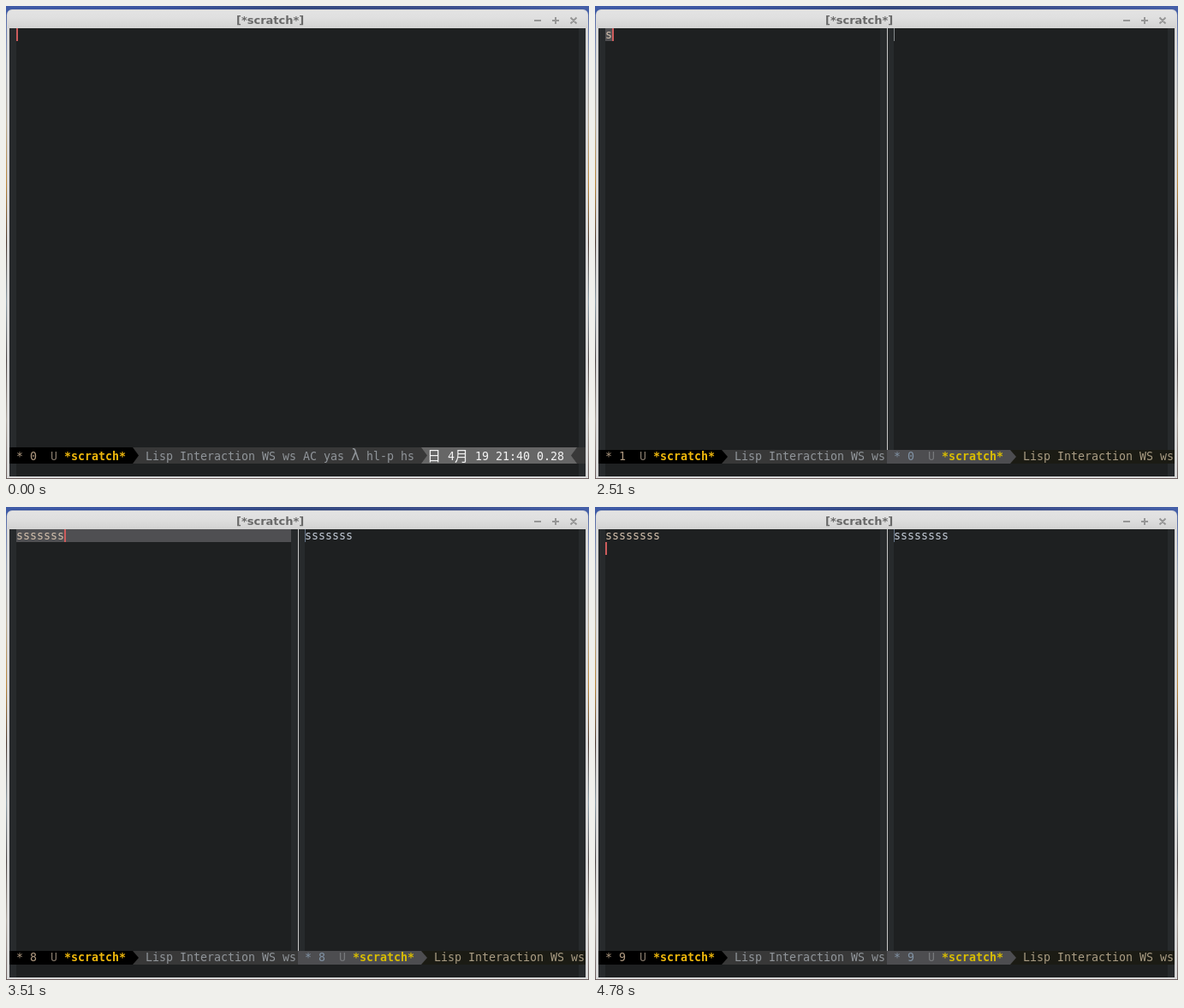
An HTML page with a canvas for the animation above (4850 ms loop, 681 by 553 pixels).

```html
<!DOCTYPE html>
<html lang="en">
<head>
<meta charset="utf-8">
<title>[*scratch*]</title>
<style>
html, body { margin: 0; width: 100%; height: 100%; overflow: hidden; background: #3c4c80; }
canvas { display: block; }
</style>
</head>
<body>
<canvas id="stage" width="681" height="553"></canvas>
<script>
const ctx = document.getElementById('stage').getContext('2d');
const LOOP = 4850, CELL = 8;
const MONO = '13.29px "DejaVu Sans Mono", monospace';
const BG = '#1e2021', FRINGE = '#272a2c', BAR = '#383838';

const timerError = name => `Error running timer \`${name}': (error "Not connected.")`;
const GREEDY = timerError('ac-update-greedy');
const MENU = timerError('ac-show-menu');

// Typing steps: time, letters on the left, letters on the right, echo message
const STEPS = [
  [0, 0, 0, ''],
  [2510, 1, 0, ''], [2570, 1, 1, ''], [2630, 1, 1, GREEDY],
  [2690, 2, 2, ''], [2750, 2, 2, GREEDY],
  [2820, 3, 3, ''], [2920, 3, 3, GREEDY],
  [2960, 4, 3, ''], [3020, 4, 4, ''], [3080, 4, 4, GREEDY],
  [3130, 5, 4, ''], [3170, 5, 5, ''], [3230, 5, 5, GREEDY],
  [3300, 6, 6, ''], [3400, 6, 6, GREEDY],
  [3460, 7, 7, ''], [3570, 7, 7, GREEDY],
  [3630, 8, 7, ''], [3680, 8, 8, ''], [3780, 8, 8, GREEDY],
  [4450, 8, 8, MENU], [4720, 8, 8, '']
];

function rect(x, y, w, h, color) {
  ctx.fillStyle = color;
  ctx.fillRect(x, y, w, h);
}

function text(str, x, y, color, font = MONO) {
  ctx.font = font;
  ctx.fillStyle = color;
  ctx.fillText(str, x, y);
}

function poly(color, ...pts) {
  ctx.fillStyle = color;
  ctx.beginPath();
  for (let i = 0; i < pts.length; i += 2) ctx.lineTo(pts[i], pts[i + 1]);
  ctx.fill();
}

function gradient(x, y, colors) {
  const g = ctx.createLinearGradient(0, 0, x, y);
  colors.forEach((c, i) => g.addColorStop(i / (colors.length - 1), c));
  return g;
}

function drawWindow() {
  rect(0, 0, 681, 553, gradient(0, 553,
    ['#4a62a8', '#8f9ab0', '#b5a58c', '#b98438', '#4a3830', '#8a9aa4', '#4c4444', '#a8a098', '#6a5c5c']));
  rect(0, 0, 681, 10, gradient(681, 0, ['#3f5ba6', '#3c55a0', '#35497f', '#3d4f8c', '#4560a8']));
  ctx.beginPath();
  ctx.roundRect(1, 4, 679, 548, [6, 6, 0, 0]);
  ctx.fillStyle = '#d8d8d8';
  ctx.fill();
  ctx.beginPath();
  ctx.roundRect(2, 5, 677, 21, [5, 5, 0, 0]);
  ctx.fillStyle = gradient(0, 26, ['#e4e4e4', '#e0e0e0', '#d2d2d2']);
  ctx.fill();
  text('[*scratch*]', 269, 21, '#696969', 'bold 13px "DejaVu Sans", sans-serif');

  ctx.strokeStyle = '#969696';
  ctx.lineWidth = 2;
  ctx.beginPath();
  ctx.moveTo(617, 17); ctx.lineTo(625, 17);
  ctx.moveTo(638, 17); ctx.lineTo(646, 17);
  ctx.moveTo(642, 13); ctx.lineTo(642, 21);
  ctx.moveTo(659.5, 13.5); ctx.lineTo(666.5, 20.5);
  ctx.moveTo(666.5, 13.5); ctx.lineTo(659.5, 20.5);
  ctx.stroke();

  rect(4, 26, 673, 524, FRINGE);
  rect(12, 26, 657, 524, BG);
}

function modeLine(x, top, right, count, active) {
  const [buf, rest, size, state, label] = active
    ? ['#000000', BAR, '#b09a80', '#85786a', '#90959a']
    : ['#4d4d50', '#1b1b14', '#8092a4', '#77797c', '#a99c83'];
  const mid = (top + 535) / 2;
  ctx.save();
  ctx.beginPath();
  ctx.rect(x, top, right - x, 535 - top);
  ctx.clip();
  rect(x, top, right - x, 535 - top, rest);
  rect(x, top, 144, 535 - top, buf);
  poly(buf, x + 144, top, x + 151, mid, x + 144, 535);
  text('* ' + count, x + 8, 531, size);
  text('U', x + 48, 531, state);
  text('*scratch*', x + 64, 531, active ? '#efb80c' : '#d9bd00', 'bold ' + MONO);
  text('Lisp Interaction WS ws AC yas', x + 159, 531, label);
  ctx.restore();
}

function singlePane(load) {
  const top = 516, mid = 525.5, grey = '#666666', white = '#f4f4f4';
  const cjk = '16px "Noto Sans CJK JP", "Noto Sans CJK", sans-serif';
  modeLine(4, top, 677, 0, true);
  text('λ', 403, 531, '#90959a', '17px "DejaVu Sans", sans-serif');
  text('hl-p hs', 421, 531, '#90959a');
  rect(485, top, 182, 19, grey);
  poly(BAR, 485, top, 492, mid, 485, 535);
  poly(BAR, 667, top, 660, mid, 667, 535);
  text('日', 492, 532, white, cjk);
  text('4', 516, 531, white);
  text('月', 524, 532, white, cjk);
  text('19 21:40 ' + load, 548, 531, white);
  rect(12, 26, 2, 15, '#cd5c5c');
}

function splitPanes(t) {
  const [, left, right, message] = STEPS.findLast(s => s[0] <= t);
  const newLine = t >= 4720;
  // The buffer gains a final newline once the first letter has settled
  const size = (n, settled) => n + (settled ? 1 : 0);

  rect(333, 26, 16, 493, FRINGE);
  rect(341, 26, 1, 493, '#c8c8c8');
  if (left && !newLine) rect(12, 26, right ? 321 : CELL, 15, '#4f4f52');
  text('s'.repeat(left), 12, 38, '#d2bfac');
  text('s'.repeat(right), 349, 38, '#c2cad6');
  if (newLine) rect(12, 41, 2, 15, '#cd5c5c');
  else rect(12 + left * CELL, 26, 2, 15, '#cd5c5c');
  rect(349, 26, 1, 15, right ? '#66768a' : '#85898c');

  modeLine(4, 519, 341, size(left, right), true);
  modeLine(341, 519, 677, size(right, right), false);
  text(message, 12, 547, '#cfc8bc');
}

function draw(now) {
  const t = now % LOOP;
  drawWindow();
  if (t < 1380) singlePane(t < 1080 ? '0.28' : '0.26');
  else splitPanes(t);
}

const start = performance.now();
function tick() {
  draw(performance.now() - start);
  requestAnimationFrame(tick);
}
tick();
</script>
</body>
</html>
```
